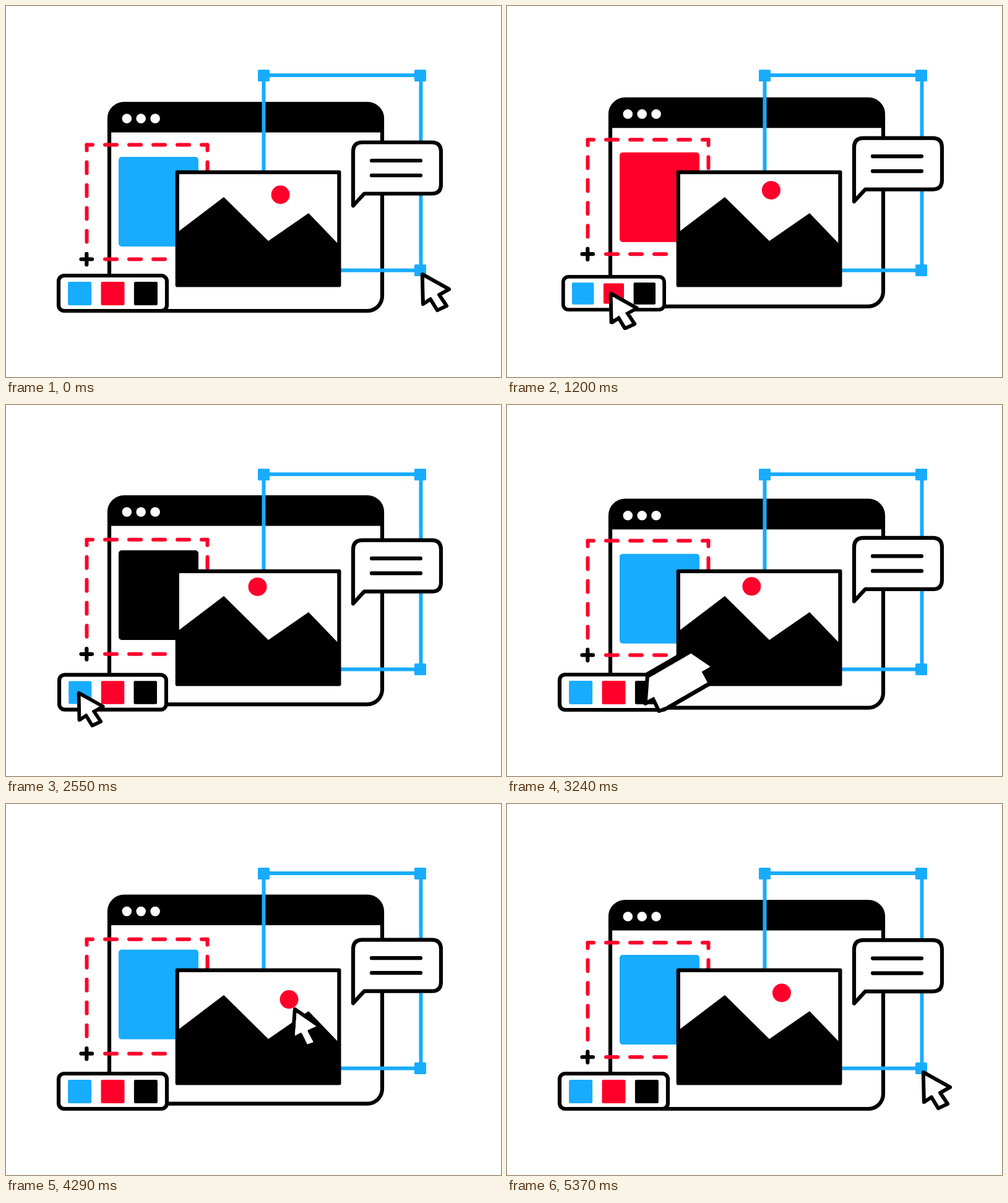
Recreate the animation shown at these times as an HTML page. Size 800 px wide and 600 px high, loop 5.4 s.

```html
<!DOCTYPE html>
<html lang="en">
<head>
<meta charset="utf-8">
<title>Design tools</title>
<style>
  html, body { margin: 0; width: 100%; height: 100%; overflow: hidden; background: #fff; }
  svg { display: block; width: 800px; height: 600px; }
  .line { fill: #fff; stroke: #000; stroke-width: 6.2; stroke-linecap: round; stroke-linejoin: round; }
  .blue { fill: #18acff; }
  .red { fill: #ff002b; }
  .frame { fill: none; stroke: #18acff; stroke-width: 6; }
  .dash { fill: none; stroke: #ff002b; stroke-width: 6; stroke-linecap: round; }
</style>
</head>
<body>
<svg viewBox="0 0 800 600">
  <g id="win">
    <rect class="line" x="167" y="158" width="441" height="335" rx="24"/>
    <path d="M167 204.5V182a24 24 0 0 1 24-24H584a24 24 0 0 1 24 24V204.5Z"/>
    <path d="M195.3 182h46" stroke="#fff" stroke-width="15.6" stroke-linecap="round" stroke-dasharray="0 22.9"/>
    <rect id="card" x="182" y="244" width="129" height="145" rx="5"/>
  </g>

  <g id="marquee">
    <path class="dash" stroke-dasharray="19 20" stroke-dashoffset="9.5" d="M130.5 224.5H325.5"/>
    <path class="dash" stroke-dasharray="18 19" stroke-dashoffset="9" d="M130.5 224.5V390M325.5 224.5V290"/>
    <path class="dash" stroke-dasharray="19 20" d="M160 409.5H280"/>
    <path class="line" d="M121.5 409.5h17.5M130.3 400.8v17.5"/>
  </g>

  <rect class="frame" x="416.5" y="112" width="254" height="315.5"/>
  <g class="blue">
    <rect x="407" y="103" width="19" height="19" rx="1.5"/>
    <rect x="660" y="103" width="19" height="19" rx="1.5"/>
    <rect x="660" y="418" width="19" height="19" rx="1.5"/>
  </g>

  <rect class="line" x="276.8" y="268.8" width="261.6" height="182.6"/>
  <circle id="sun" class="red" r="15"/>
  <path d="M277 366L352 309L424 380L489 335L538 386V451H277Z"/>

  <g id="bubble">
    <path class="line" d="M561 323V236Q561 220.5 576 220.5H688Q703 220.5 703 236V288.5Q703 303.5 688 303.5H579Z"/>
    <path class="line" d="M591 250H670M591 274H670"/>
  </g>

  <g id="palette">
    <rect class="line" x="-87.5" y="-28.5" width="175" height="57" rx="9"/>
    <rect class="swatch blue" x="-19" y="-19" width="38" height="38" rx="2"/>
    <rect class="swatch red" x="-19" y="-19" width="38" height="38" rx="2"/>
    <rect class="swatch" x="-19" y="-19" width="38" height="38" rx="2"/>
  </g>

  <path id="outline" class="line"/>
  <path id="inside" fill="#fff"/>
</svg>
<script>
const LOOP = 5400, BOB = 1800, MOVE = 360, PULL = 170;
const GRAB = 3560, DROP = 4300, SMEAR = 30, COPIES = 60;
const colors = ['#18acff', '#ff002b', '#000'];
const clicks = [{ at: 1130, swatch: 1 }, { at: 1750, swatch: 2 }, { at: 2560, swatch: 0 }];
const byId = id => document.getElementById(id);
const swatches = document.querySelectorAll('.swatch');

const clamp = u => Math.min(1, Math.max(0, u));
const ease = u => u < .5 ? 4 * u ** 3 : 1 - 4 * (1 - u) ** 3;
const ramp = (t, start, length) => ease(clamp((t - start) / length));
const swing = u => Math.sin(2 * Math.PI * clamp(u));

// Palette: squeezed by a click, then a weaker bounce outwards.
function squeeze(t, click) {
  const u = (t - click.at + 20) / 500;
  return 1 - .09 * (1 - clamp(u)) * swing(u);
}

// Cursor: grows before a click, then presses down.
const press = (t, click) => 1 + .1 * swing((t - click.at + 400) / 520);

const product = (t, rule) => clicks.reduce((s, click) => s * rule(t, click), 1);

function bob(t, delay) {
  const wave = x => Math.cos(2 * Math.PI * x / BOB);
  return 4.8 * (wave(t - delay) - wave(delay));
}

// The sun drifts left along its arc until it is dragged back.
function drift(t) {
  const s = ((t - DROP + LOOP) % LOOP) / 1000;
  return 457.5 - 12.1 * s - .51 * s * s;
}

function sunAt(t) {
  let x = drift(t);
  if (t > GRAB && t < DROP) {
    const left = drift(GRAB);
    x = left + (drift(DROP) - left) * ramp(t, GRAB, DROP - GRAB - 40);
  }
  const d = x - 393;
  return [x, 293.3 + .0034 * d ** 2 + 5e-7 * d ** 4];
}

const hand = t => [sunAt(t)[0] + 9.5, sunAt(t)[1] + 16];
const over = i => [172.3 + 54.5 * (i - 1), 466];
const home = [673, 434];

const moves = [
  { at: 300, from: home, to: over(1), pull: 14 },
  { at: 1250, from: over(1), to: over(2), pull: 5 },
  { at: 1970, from: over(2), to: over(0), pull: 10 },
  { at: 3042, from: over(0), to: hand(GRAB), pull: 14 },
  { at: DROP, from: hand(DROP), to: home, pull: 0 }
];

// Each move first pulls back a little, then follows a sagging curve.
function cursorAt(t) {
  if (t > GRAB && t < DROP) return hand(t);
  const { at, from, to, pull } = moves.filter(m => t >= m.at - PULL).pop() || moves[0];
  const dist = Math.hypot(to[0] - from[0], to[1] - from[1]);
  const sag = [0, Math.min(66, .19 * dist)];
  const back = pull / dist * ramp(t, at - PULL, PULL);
  const e = ramp(t, at, MOVE), f = 1 - e;
  return [0, 1].map(i => {
    const a = from[i] - (to[i] - from[i]) * back;
    const mid = (a + to[i]) / 2 + sag[i];
    return f * f * a + 2 * e * f * mid + e * e * to[i];
  });
}

function inset(shape, width) {
  const normal = (a, b) => {
    const dx = b[0] - a[0], dy = b[1] - a[1], l = Math.hypot(dx, dy);
    return [dy / l, -dx / l];
  };
  const n = shape.length;
  return shape.map((p, i) => {
    const m = normal(shape[(i + n - 1) % n], p), k = normal(p, shape[(i + 1) % n]);
    const w = width / (1 + m[0] * k[0] + m[1] * k[1]);
    return [p[0] + (m[0] + k[0]) * w, p[1] + (m[1] + k[1]) * w];
  });
}

const arrow = [[0, 0], [1, 48], [13, 40], [24, 58], [39, 51], [27, 33], [43, 24]];
const arrowInside = inset(arrow, 3);

// Fast moves sweep the arrow from its previous place to the current one.
function sweep(t, points) {
  const scale = product(t, press);
  const turn = .095 * (ramp(t, 3042, PULL) - ramp(t, DROP, MOVE));
  const cos = Math.cos(turn) * scale, sin = Math.sin(turn) * scale;
  const shape = points.map(([x, y]) => [x * cos - y * sin, x * sin + y * cos]);
  const [x0, y0] = cursorAt(t - SMEAR), [x1, y1] = cursorAt(t);
  const n = Math.hypot(x1 - x0, y1 - y0) < .3 ? 0 : COPIES;
  let d = '';
  for (let i = 0; i <= n; i++) {
    const k = n ? i / n : 1;
    const x = x0 + (x1 - x0) * k, y = y0 + (y1 - y0) * k;
    d += 'M' + shape.map(p => (p[0] + x).toFixed(2) + ' ' + (p[1] + y).toFixed(2)).join('L') + 'Z';
  }
  return d;
}

function place(node, x, y, scale = 1) {
  node.setAttribute('transform', `translate(${x} ${y}) scale(${scale})`);
}

function draw() {
  const t = performance.now() % LOOP;
  place(byId('win'), 0, bob(t, 0));
  place(byId('marquee'), 0, bob(t, 145));
  place(byId('bubble'), 0, bob(t, 320));
  place(byId('sun'), ...sunAt(t));
  place(byId('palette'), 172.5, 464.5, product(t, squeeze));
  for (const click of clicks) {
    const i = click.swatch;
    place(swatches[i], (i - 1) * 53.4, .5, squeeze(t, click));
  }
  const last = clicks.filter(c => t >= c.at + 30).pop();
  byId('card').setAttribute('fill', colors[last ? last.swatch : 0]);
  byId('outline').setAttribute('d', sweep(t, arrow));
  byId('inside').setAttribute('d', sweep(t, arrowInside));
  requestAnimationFrame(draw);
}
draw();
</script>
</body>
</html>
```
